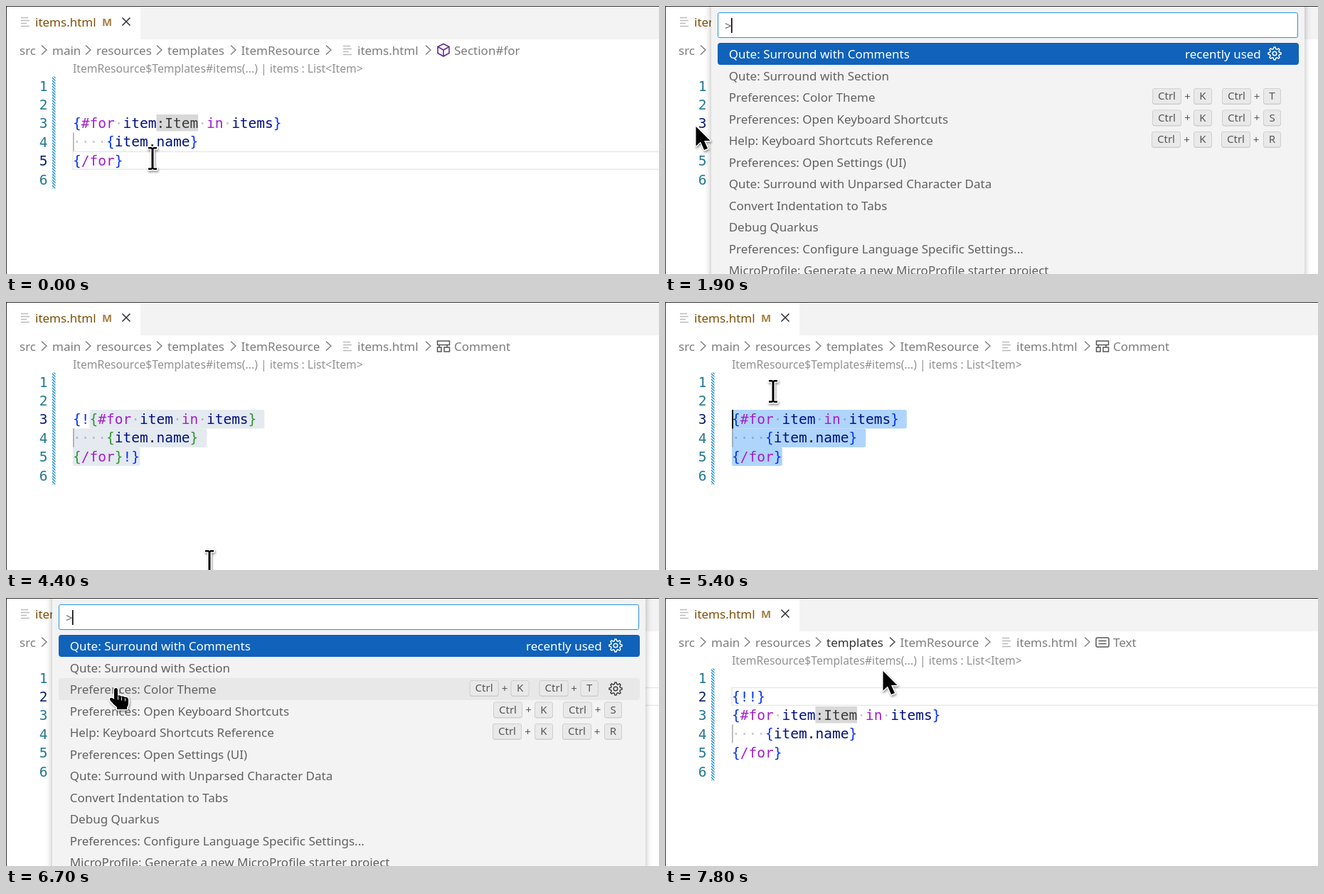
Animation of 918 by 378 pixels, one loop 8 s. Source, as an HTML page:

```html
<!DOCTYPE html>
<html lang="en">
<head>
<meta charset="utf-8">
<title>Surround with comments</title>
<style>
  html, body { margin: 0; width: 100%; height: 100%; overflow: hidden; background: #fff; }
  svg { display: block; }
  text { font: 17px "Noto Sans", sans-serif; fill: #616161; white-space: pre; }
  .code { font: 19.5px "DejaVu Sans Mono", monospace; fill: #237893; }
  .active { fill: #0b216f; }
  .brace { fill: #0431fa; }
  .nested { fill: #319331; }
  .keyword { fill: #a31fcb; }
  .name { fill: #001080; }
  .plain { fill: #111; }
  .hint { fill: #3a3a3a; }
  .dot { fill: rgba(51, 51, 51, .27); }
  .crumb { fill: #7c7c7c; }
  .crumb.hover { fill: #333; }
  .lens { font-size: 15.7px; fill: #919191; }
  .key { font-size: 15px; fill: #555; text-anchor: middle; }
  .line { fill: none; stroke: #7c7c7c; stroke-width: 1.4; }
  .line.hover { stroke: #444; }
  .panel { fill: #f3f3f3; filter: drop-shadow(0 0 5px rgba(0, 0, 0, .3)); }
  .cursor { fill: #000; stroke: #fff; stroke-width: 3; stroke-linejoin: round; paint-order: stroke;
            filter: drop-shadow(1px 2px 1.5px rgba(0, 0, 0, .4)); }
</style>
</head>
<body>
<svg id="stage" width="918" height="378" viewBox="0 0 918 378"></svg>
<script>
const LOOP = 8000, LEFT = 94, CHAR = 11.74, ROW = 26.3;
const stage = document.getElementById('stage');
const lineTop = n => 99.5 + ROW * (n - 1);
const baseline = n => 119.6 + 26.4 * (n - 1);
const column = n => LEFT + CHAR * n;

const text = (x, y, content, cls = '', extra = '') =>
  `<text x="${x}" y="${y}" class="${cls}" ${extra}>${content}</text>`;
const rect = (x, y, w, h, fill, extra = '') =>
  `<rect x="${x}" y="${y}" width="${w}" height="${h}" fill="${fill}" ${extra}/>`;
const path = (d, cls = 'line', extra = '') => `<path d="${d}" class="${cls}" ${extra}/>`;
const span = (cls, content) => `<tspan class="${cls}">${content}</tspan>`;

// Each step changes only the named parts of the state.
const beam = (x, y) => ({ mouse: ['beam', x, y] });
const hand = (x, y) => ({ mouse: ['hand', x, y] });
const arrow = (x, y) => ({ mouse: ['arrow', x, y] });
const steps = [
  [0, { line: 5, box: true, caret: 0, sel: '', doc: 'plain', hint: true, crumb: 'Section#for',
        hover: '', palette: false, row: 0, prompt: true, ...beam(206, 215) }],
  [400, beam(168, 219)],
  [500, { ...beam(110, 206), box: false, sel: 'start' }],
  [600, { ...beam(60, 176), line: 3, sel: 'full', caret: 3 }],
  [700, beam(43, 170)],
  [800, { crumb: 'Text' }],
  [1100, { caret: 0 }],
  [1600, { caret: 3 }],
  [1900, { ...arrow(43, 170), palette: true }],
  [2300, arrow(50, 137)],
  [2400, arrow(54, 107)],
  [3000, { ...hand(98, 85), row: 1 }],
  [3100, { ...hand(138, 65), row: 0 }],
  [3200, { palette: false, doc: 'comment', sel: 'idle', caret: 0, hover: 'resources' }],
  [3500, { ...beam(180, 150), hover: '' }],
  [3600, { ...beam(238, 280), crumb: 'Comment' }],
  [3700, beam(286, 366)],
  [4400, { hint: false }],
  [4900, beam(235, 270)],
  [5000, beam(183, 182)],
  [5400, { ...beam(152, 126), doc: 'plain', sel: 'full', caret: 3 }],
  [5600, { line: 2, box: true, sel: '', caret: 2 }],
  [5700, { crumb: 'Text' }],
  [6300, { caret: 0 }],
  [6400, { hint: true }],
  [6700, { ...hand(152, 128), palette: true, row: 2 }],
  [6900, hand(172, 116)],
  [7000, { ...hand(202, 98), row: 1 }],
  [7100, { ...hand(234, 82), row: 0 }],
  [7200, { ...hand(250, 74), prompt: false }],
  [7300, hand(256, 71)],
  [7500, arrow(256, 71)],
  [7700, { palette: false, doc: 'empty', hover: 'templates' }],
  [7800, arrow(306, 103)]
];
let merged = {};
const states = steps.map(([time, change]) => ({ time, ...(merged = { ...merged, ...change }) }));

const fileIcon = (x, y) =>
  path(`M${x} ${y}h10m-10 4h12m-12 4h8m-8 4h12`, 'line', 'style="stroke:#bbb"');

const symbols = {
  'Section#for': path('M615 53.5l8 4v9l-8 4.5-8-4.5v-9zm-8 4l8 4.5 8-4.5m-8 4.5v9', 'line',
    'style="stroke:#652d90;stroke-width:1.6"'),
  Text: path('M608 56h14q2 0 2 2v9q0 2-2 2h-14q-2 0-2-2v-9q0-2 2-2zm1.5 4.5h11m-11 4h11', 'line',
    'style="stroke:#555;stroke-width:1.5"'),
  Comment: path('M606.5 55h17v5.5h-17zm0 9h5.5v6h-5.5zm9.5 0h7.5v6h-7.5zm-7-3.5v3.5m11-3.5v3.5', 'line',
    'style="stroke:#555;stroke-width:1.5"')
};

function header(s) {
  const crumbs = [['src', 19, 50], ['main', 65, 112], ['resources', 127, 212],
    ['templates', 227, 316], ['ItemResource', 330.5, 450], ['items.html', 494, 590]];
  return rect(189, 1, 729, 46, '#f3f3f3')
    + fileIcon(21, 16.5) + text(41, 28.5, 'items.html', '', 'style="fill:#7f4f06"')
    + text(135, 28, 'M', '', 'style="fill:#895503;font-size:15px;font-weight:600;opacity:.75"')
    + path('M163.5 16.5l11 11m0-11l-11 11', 'line', 'style="stroke:#333;stroke-width:1.6"')
    + crumbs.map(([label, x, chevron]) => {
        const hover = s.hover === label ? ' hover' : '';
        return text(x, 69, label, 'crumb' + hover) + path(`M${chevron} 55.5l7 6.5-7 6.5`, 'line' + hover);
      }).join('')
    + fileIcon(474, 56.5) + symbols[s.crumb] + text(630, 69, s.crumb, 'crumb')
    + text(LEFT, 94, 'ItemResource$Templates#items(...) | items : List&lt;Item&gt;', 'lens');
}

function selection(s, prefix) {
  if (!s.sel) return '';
  const fill = s.sel === 'idle' ? '#e4eaf0' : '#afd5fd';
  const block = (n, from, to) =>
    rect(column(from), lineTop(n), CHAR * (to - from) + .5, ROW + .2, fill, 'rx="3"');
  if (s.sel === 'start') return block(5, 1, 6);
  return block(3, prefix, (s.hint ? 26 : 21) + prefix - .1) + block(4, 0, 16) + block(5, 0, 6 + prefix)
    + rect(LEFT, lineTop(4), 5, ROW + 6, fill)
    + rect(column(prefix), lineTop(3) + 10, 5, ROW, fill);
}

function editor(s) {
  const commented = s.doc === 'comment', prefix = commented ? 2 : 0;
  const brace = c => span(commented ? 'nested' : 'brace', c);
  const dot = span('dot', '·');
  const lines = {
    2: s.doc === 'empty' ? span('brace', '{!!}') : '',
    3: (commented ? span('brace', '{!') : '') + brace('{') + span('keyword', '#for') + dot
      + span('name', 'item') + (s.hint ? span('hint', ':Item') : '') + dot + span('keyword', 'in')
      + dot + span('name', 'items') + brace('}'),
    4: span('dot', '····') + brace('{') + span('name', 'item') + span('plain', '.')
      + span('name', 'name') + brace('}'),
    5: brace('{') + span('keyword', '/for') + brace('}') + (commented ? span('brace', '!}') : '')
  };
  let out = selection(s, prefix);
  if (s.box) out += rect(LEFT, lineTop(s.line) + .7, 840, ROW - 1.4, 'none', 'stroke="#e9e9e9" stroke-width="1.5"');
  if (s.hint) out += rect(column(10 + prefix), lineTop(3) + .9, CHAR * 5, 23.5, 'rgba(185,185,185,.55)');
  out += rect(LEFT + .3, lineTop(4), 1.2, ROW, '#939393');
  for (let n = 1; n <= 6; n++) {
    out += text(58.5, Math.round(baseline(n)), n, 'code' + (n === s.line ? ' active' : ''), 'text-anchor="end"')
      + text(LEFT, Math.round(baseline(n) - .4), lines[n] || '', 'code');
  }
  if (s.caret) out += rect(LEFT, lineTop(s.caret), 2, ROW, '#000');
  return out + rect(65, 99.5, 4.5, 158, 'url(#hatch)');
}

const commands = ['Qute: Surround with Comments', 'Qute: Surround with Section',
  'Preferences: Color Theme', 'Preferences: Open Keyboard Shortcuts',
  'Help: Keyboard Shortcuts Reference', 'Preferences: Open Settings (UI)',
  'Qute: Surround with Unparsed Character Data', 'Convert Indentation to Tabs', 'Debug Quarkus',
  'Preferences: Configure Language Specific Settings...',
  'MicroProfile: Generate a new MicroProfile starter project'];
const shortcuts = { 2: 'T', 3: 'S', 4: 'R' };

function gear(y, color) {
  const points = [];
  for (let i = 0; i < 32; i++) {
    const a = (i - .5) * Math.PI / 16, r = i % 4 < 2 ? 9 : 6.7;
    points.push(`${(857 + r * Math.cos(a)).toFixed(1)} ${(y + r * Math.sin(a)).toFixed(1)}`);
  }
  return `<g fill="none" stroke="${color}" stroke-width="1.5"><path d="M${points.join('L')}Z"/>`
    + `<circle cx="857" cy="${y}" r="2.8"/></g>`;
}

function keys(letter, y, shift) {
  const cap = (x, w, label) =>
    rect(x, y - 11, w, 23, '#c8c8c8', 'rx="4"')
    + rect(x + .8, y - 10.2, w - 1.6, 21, '#e9e9e9', 'rx="3"')
    + text(x + w / 2, y + 5, label, 'key');
  const x = (letter === 'R' ? 684 : 685) - shift;
  return cap(x, 41, 'Ctrl') + text(x + 49.5, y + 5.5, '+', 'key') + cap(743 - shift, 26, 'K')
    + cap(x + 98, 41, 'Ctrl') + text(x + 147, y + 5.5, '+', 'key') + cap(841 - shift, 25, letter);
}

function palette(s) {
  let out = '<rect x="65" y="-10" width="834" height="400" class="panel"/>'
    + rect(74.5, 9.5, 815, 35, '#fff', 'rx="2" stroke="#2b93dc"')
    + text(84, 34, '&gt;');
  if (s.prompt) out += rect(93, 17, 1.6, 21, '#000');
  commands.forEach((label, i) => {
    const top = 52 + 30.5 * i, hover = i > 0 && i === s.row;
    if (i === 0) out += rect(74, top, 817, 31, '#1062ba', 'rx="4"') + gear(67, '#fff')
      + text(731, 74, 'recently used', '', 'style="fill:#fff"');
    if (hover) out += rect(74, top, 817, 31, '#e8e8e8', 'rx="4"') + gear(top + 15, '#424242');
    out += text(89.7, top + 22, label, '', i ? '' : 'style="fill:#fff"');
    if (shortcuts[i]) out += keys(shortcuts[i], top + 14, hover ? 33.4 : 0);
  });
  return out;
}

const cursors = {
  arrow: 'M.5 0V27.5L7 21.5 12 33 17 31 12 20H20.500Z',
  beam: 'M-6-16h4.500l1.500 1 1.500-1h4.500v2.500h-4.500v27h4.500v2.500h-4.500l-1.500-1-1.500 1h-4.500v-2.500h4.500v-27h-4.500z',
  hand: 'M0 2q0-3 2.500-3t2.500 3v8q3-2 5 1 3-1.500 5 1 4-1 5 3v5q0 4-2 6v3h-14v-3q-5-4-9-9-2-3 0-4t5 2z'
};

function mouse([shape, x, y]) {
  const knuckles = shape === 'hand'
    ? '<path d="M5.500 10.500v5M10.500 12v4.500M15.500 13.500v4" stroke="#fff"/>' : '';
  return `<g transform="translate(${x} ${y})">${path(cursors[shape], 'cursor')}${knuckles}</g>`;
}

const hatch = `<defs><pattern id="hatch" width="4" height="4" patternUnits="userSpaceOnUse">
  <path d="M-1-1l6 6M-1 3l2 2M3-1l2 2" stroke="#2090d3" stroke-width="1.5"/></pattern></defs>`;

function draw(s) {
  stage.innerHTML = hatch + header(s) + editor(s) + (s.palette ? palette(s) : '')
    + rect(0, 0, 918, 1, '#333') + rect(0, 0, 1, 378, '#333') + mouse(s.mouse);
}

let shown, start;
function tick(now) {
  start ??= now;
  const time = (now - start) % LOOP;
  const state = states.findLast(s => s.time <= time);
  if (state !== shown) draw(shown = state);
  requestAnimationFrame(tick);
}
draw(shown = states[0]);
requestAnimationFrame(tick);
</script>
</body>
</html>
```
